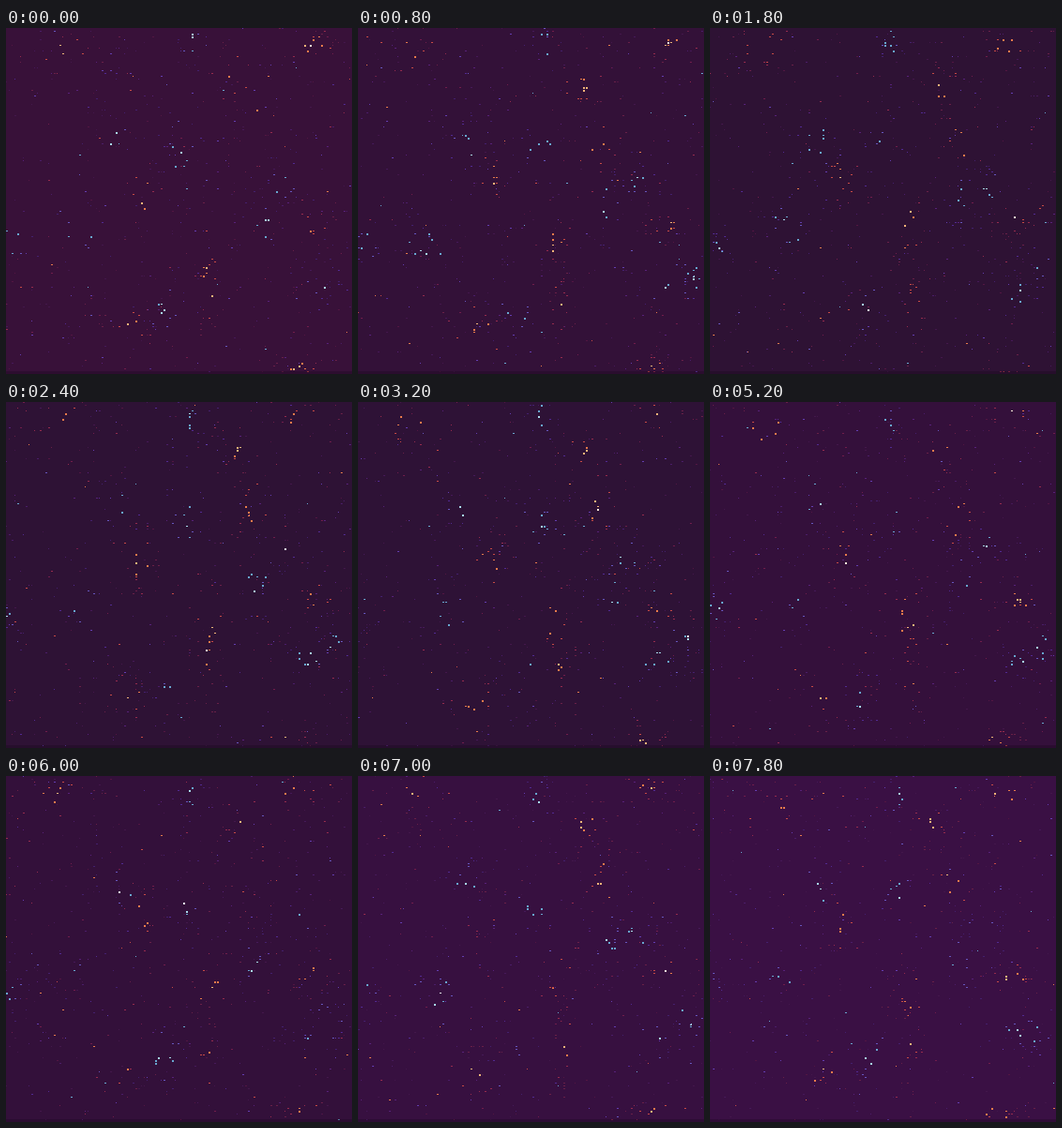
Animation, 369 px wide and 369 px high, one loop 8 s. Source, as an HTML page with a canvas:

```html
<!DOCTYPE html>
<html lang="en">
<head>
<meta charset="utf-8">
<title>Sparks</title>
<style>
  html, body { margin: 0; width: 100%; height: 100%; overflow: hidden; background: #381139; }
  canvas { display: block; width: 369px; height: 369px; }
</style>
</head>
<body>
<canvas id="stage" width="369" height="369"></canvas>
<script>
const SIZE = 369, CELL = 3, STEP = 200, STEPS = 40;
const ctx = document.getElementById('stage').getContext('2d');

// x, y, horizontal spread, vertical spread
const warmSpots = [
  [60, 26, 24, 13], [243, 54, 14, 14], [262, 118, 13, 22], [143, 162, 10, 25],
  [214, 228, 10, 24], [125, 312, 18, 15], [328, 213, 14, 10], [322, 14, 16, 9],
  [217, 294, 6, 24], [312, 360, 13, 6]
];
const coldSpots = [
  [192, 132, 13, 19], [299, 165, 16, 13], [84, 218, 18, 18], [172, 305, 13, 19],
  [352, 266, 12, 15], [8, 228, 9, 14], [269, 194, 9, 22], [114, 116, 14, 20],
  [197, 20, 8, 14], [325, 278, 14, 10]
];
const warmRamp = ['#682047', '#942b4d', '#c64a45', '#e87b4b', '#f2b579', '#fff0dc'];
const coldRamp = ['#43206d', '#512a91', '#6656bd', '#68a7cf', '#a9dced', '#f4faff'];
const dimColors = ['#43174b', '#451958', '#4a1d68', '#572179', '#521642', '#701d4b', '#633db0'];

// time in seconds followed by the backdrop color
const backdrop = [
  [0, 56, 17, 57], [0.8, 51, 17, 56], [1.8, 46, 18, 52], [3.2, 46, 18, 54],
  [4.4, 52, 16, 60], [6, 51, 16, 58], [7.8, 58, 16, 68]
];

function randomFrom(seed) {
  let state = seed >>> 0;
  return () => {
    state = (state + 0x6D2B79F5) >>> 0;
    let n = Math.imul(state ^ state >>> 15, state | 1);
    n ^= n + Math.imul(n ^ n >>> 7, n | 61);
    return ((n ^ n >>> 14) >>> 0) / 4294967296;
  };
}

const bell = random => (random() + random() + random() + random() - 2) * 1.7;
const snap = value => Math.floor(value / CELL) * CELL;

function backdropAt(seconds) {
  let i = backdrop.findIndex(stop => stop[0] > seconds);
  if (i < 0) i = backdrop.length - 1;
  const from = backdrop[i - 1], to = backdrop[i];
  const part = Math.min(1, (seconds - from[0]) / (to[0] - from[0]));
  const mix = from.slice(1).map((v, k) => Math.round(v + (to[k + 1] - v) * part));
  return `rgb(${mix.join(',')})`;
}

function dot(x, y, color, width, height) {
  ctx.fillStyle = color;
  ctx.fillRect(snap(x), snap(y), width, height);
}

function drawDust(step) {
  const random = randomFrom(step * 7919 + 31);
  for (let i = 0; i < 350; i++) {
    const color = dimColors[Math.floor(random() ** 1.35 * dimColors.length)];
    dot(random() * SIZE, random() * SIZE, color, random() < 0.4 ? 2 : 1, 1);
  }
}

function drawSpot([x, y, spreadX, spreadY], ramp, id, step) {
  const drift = randomFrom(id * 1013 + step * 101);
  const centerX = x + bell(drift) * spreadX * 0.4;
  const centerY = y + bell(drift) * spreadY * 0.4;
  const count = 12 + Math.floor(drift() * 9);

  for (let i = 0; i < count; i++) {
    const life = 1 + i % 2;
    const epoch = Math.floor((step + i % life) / life);
    const random = randomFrom(id * 100003 + i * 1009 + epoch * 9176);
    const px = x + bell(random) * spreadX * 1.25;
    const py = y + bell(random) * spreadY * 1.25;
    const distance = Math.hypot((px - centerX) / spreadX, (py - centerY) / spreadY);
    const heat = 5.7 - distance * 2.4 - random() * 1.5;
    const level = Math.max(0, Math.min(5, Math.floor(heat)));
    dot(px, py, ramp[level], level > 1 || random() < 0.5 ? 2 : 1,
        level > 2 && random() < 0.65 ? 2 : 1);
  }
}

function drawStrays(step) {
  const random = randomFrom(step * 4547 + 83);
  for (let i = 0; i < 75; i++) {
    const ramp = random() < 0.5 ? warmRamp : coldRamp;
    const level = 1 + Math.floor(random() ** 2 * 3);
    dot(random() * SIZE, random() * SIZE, ramp[level], random() < 0.5 ? 2 : 1, 1);
  }
}

function draw(step) {
  ctx.fillStyle = backdropAt(step * STEP / 1000);
  ctx.fillRect(0, 0, SIZE, SIZE);
  drawDust(step);
  drawStrays(step);
  warmSpots.forEach((spot, i) => drawSpot(spot, warmRamp, i + 1, step));
  coldSpots.forEach((spot, i) => drawSpot(spot, coldRamp, i + 31, step));
  ctx.fillStyle = 'rgba(20, 4, 25, .3)';
  ctx.fillRect(0, SIZE - 3, SIZE, 3);
}

const start = performance.now();
let shown = -1;
function play() {
  const step = Math.floor((performance.now() - start) / STEP) % STEPS;
  if (step !== shown) {
    draw(step);
    shown = step;
  }
  requestAnimationFrame(play);
}
play();
</script>
</body>
</html>
```
